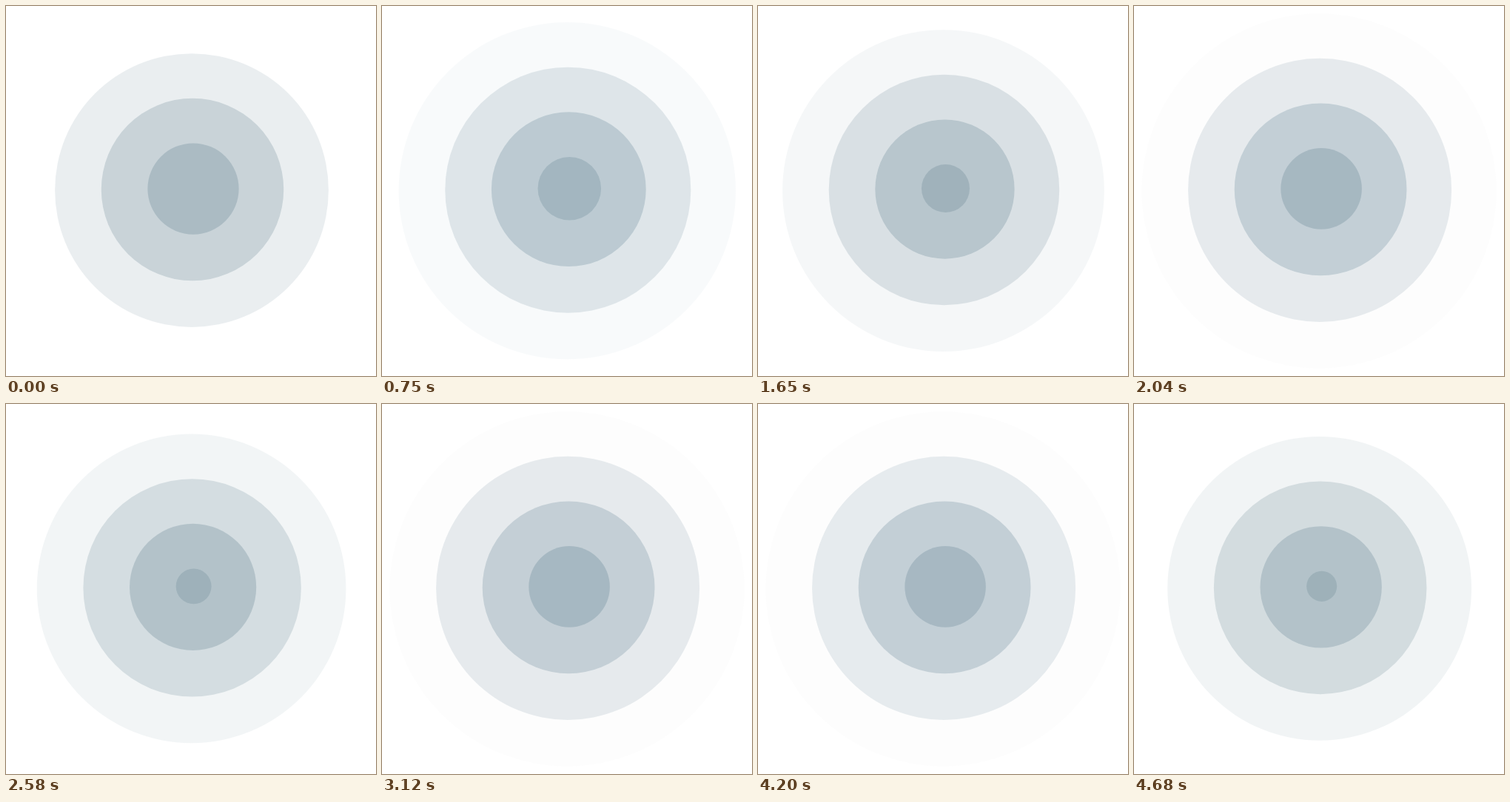
Write an HTML page that moves like this. It is 500 px wide and 500 px high and loops after 4.71 s.

```html
<!DOCTYPE html>
<html lang="en">
<head>
<meta charset="utf-8">
<title>Ripple</title>
<style>
  html, body { margin: 0; width: 100%; height: 100%; overflow: hidden; background: #fff; }
  svg { display: block; width: 100%; height: 100%; }
  circle { fill: rgb(150, 171, 181); }
</style>
</head>
<body>
<svg viewBox="0 0 500 500">
  <circle/><circle/><circle/><circle/>
</svg>
<script>
  const LOOP = 4710;   // the loop cuts back before the last ripple ends
  const LIFE = 4320;   // one ripple, from centre to full size
  const STEP = 30;
  const RADIUS = 246.5;
  const DRIFT = 4;
  const rings = [...document.querySelectorAll('circle')];

  function place(ring, p) {
    const shift = DRIFT * (1 - p);
    ring.setAttribute('cx', 250 + shift);
    ring.setAttribute('cy', 250 - shift);
    ring.setAttribute('r', RADIUS * p);
    ring.setAttribute('fill-opacity', 0.8 * (1 - p));
  }

  function draw() {
    const t = Math.floor(performance.now() % LOOP / STEP) * STEP;
    rings.forEach((ring, i) => place(ring, (t / LIFE + i / rings.length) % 1));
    requestAnimationFrame(draw);
  }

  draw();
</script>
</body>
</html>
```
